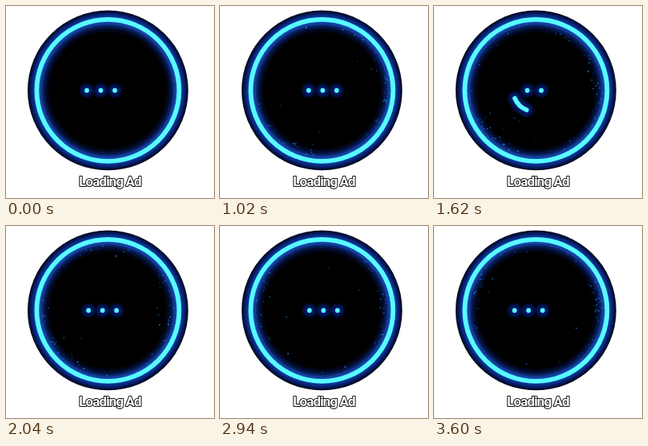
Animation of 260x241 px, one loop 3630 ms. Source, as an HTML page with a canvas:

```html
<!DOCTYPE html>
<html lang="en">
<head>
<meta charset="utf-8">
<title>Loading</title>
<style>
html, body { margin: 0; width: 100%; height: 100%; overflow: hidden; background: #fff; }
canvas { display: block; width: 260px; height: 241px; }
</style>
</head>
<body>
<canvas id="stage" width="260" height="241"></canvas>
<script>
const ctx = document.getElementById("stage").getContext("2d");
const TAU = Math.PI * 2;
const LOOP = 3630, STEP = 30, CYCLE = LOOP / 2;
const CX = 127.4, CY = 105.9, RADIUS = 100.4;
const GAP = 17.5, DOT_X = 101, DOT_Y = 106;
const CYAN = "#58faff";

let seed = 4127;
function random() {
  seed = (seed * 1664525 + 1013904223) % 4294967296;
  return seed / 4294967296;
}

// Sparks leave the ring from a source on the right, from one that
// climbs the left side, and thinly from everywhere else.
function makeSpark() {
  const birth = 250 + random() * 3300;
  const source = random();
  const spread = random() + random() - 1;
  let angle = spread * Math.PI;
  if (source < 0.35) angle = spread * 0.8;
  else if (source < 0.7) angle = 1.9 + 1.8 * birth / LOOP + spread * 0.8;
  return {
    birth, angle,
    life: 500 + random() * 900,
    spin: (random() - 0.5) * 0.4,
    depth: 2 + 10 * random() + 42 * random() ** 7,
    size: 0.45 + random() * 0.5,
    light: 38 + random() * 24
  };
}
const sparks = Array.from({ length: 290 }, makeSpark);

function easeInOut(from, to, t) {
  const u = Math.min(1, Math.max(0, (t - from) / (to - from)));
  return u < 0.5 ? 2 * u * u : 1 - 2 * (1 - u) ** 2;
}

function discGradient() {
  const g = ctx.createRadialGradient(CX, CY, 0, CX, CY, 100);
  const stops = [
    [0, "#000"], [0.72, "#000"], [0.77, "#020a28"], [0.81, "#08205e"],
    [0.83, "#103a92"], [0.86, "#184ab0"], [0.92, "#0c3a9c"],
    [0.945, "#082a80"], [0.975, "#041450"], [1, "#010618"]
  ];
  stops.forEach(([at, color]) => g.addColorStop(at, color));
  return g;
}
const discFill = discGradient();

function drawDisc() {
  ctx.fillStyle = discFill;
  ctx.beginPath();
  ctx.arc(CX, CY, RADIUS, 0, TAU);
  ctx.fill();
}

function drawRing() {
  ctx.strokeStyle = CYAN;
  ctx.lineWidth = 5.8;
  ctx.beginPath();
  ctx.arc(CX, CY, 89, 0, TAU);
  ctx.stroke();
}

function drawSparks(t) {
  for (const s of sparks) {
    const age = (t - s.birth) / s.life;
    if (age < 0 || age > 1) continue;
    const r = 84 - s.depth * (1 - (1 - age) ** 2);
    const a = s.angle + s.spin * age;
    ctx.globalAlpha = Math.min(1, age * 6, (1 - age) * 2.5) * 0.85;
    ctx.fillStyle = `hsl(207 95% ${s.light}%)`;
    ctx.beginPath();
    ctx.arc(CX + r * Math.cos(a), CY + r * Math.sin(a), s.size, 0, TAU);
    ctx.fill();
  }
  ctx.globalAlpha = 1;
}

// Strokes an arc as a glowing rounded line; a tiny sweep gives a dot.
function glowArc(x, y, r, from, to) {
  ctx.lineCap = "round";
  ctx.beginPath();
  ctx.arc(x, y, r, from, to + 0.002);
  ctx.strokeStyle = "rgba(10, 50, 190, 0.12)";
  for (let width = 20; width > 7; width -= 2) {
    ctx.lineWidth = width;
    ctx.stroke();
  }
  ctx.strokeStyle = CYAN;
  ctx.lineWidth = 5.8;
  ctx.stroke();
}

// Two dots drift right while the third swings below them to the left end.
function drawDots(t) {
  const phase = t % CYCLE;
  const x = DOT_X + GAP * phase / CYCLE;
  const head = easeInOut(1200, 1760, phase) * Math.PI;
  const tail = easeInOut(1400, 1790, phase) * Math.PI;
  const mid = x + GAP / 2;
  glowArc(mid, DOT_Y, GAP * 1.5, tail, head);
  glowArc(mid, DOT_Y, GAP / 2, 0, 0);
  glowArc(mid, DOT_Y, GAP / 2, Math.PI, Math.PI);
}

function drawCaption() {
  const label = "Loading Ad";
  ctx.font = '700 17px Impact, Roboto, "Liberation Sans", sans-serif';
  ctx.letterSpacing = "-0.9px";
  ctx.textAlign = "center";
  ctx.textBaseline = "alphabetic";
  ctx.lineJoin = "round";
  ctx.lineWidth = 2;
  ctx.strokeStyle = "#111";
  ctx.strokeText(label, 130, 226);
  ctx.fillStyle = "#fff";
  ctx.fillText(label, 130, 226);
}

function draw(t) {
  ctx.fillStyle = "#fff";
  ctx.fillRect(0, 0, 260, 241);
  drawDisc();
  drawSparks(t);
  drawRing();
  drawDots(t);
  drawCaption();
}

const start = performance.now();
function tick() {
  const t = (performance.now() - start) % LOOP;
  draw(Math.floor(t / STEP) * STEP);
  requestAnimationFrame(tick);
}
tick();
</script>
</body>
</html>
```
